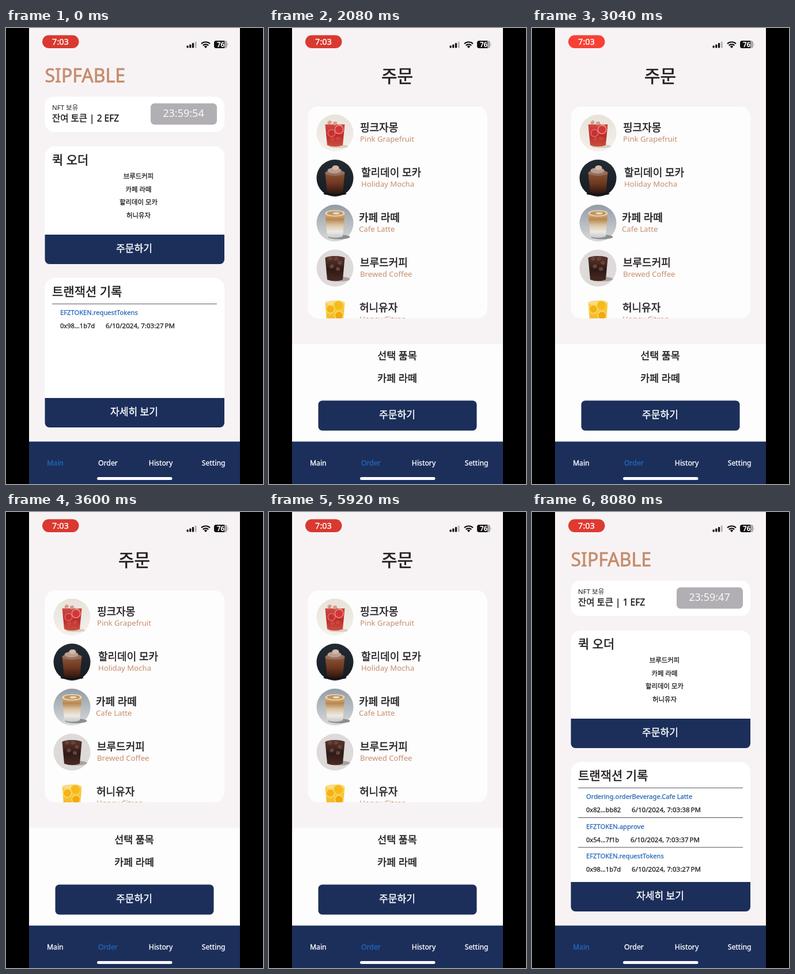
Recreate the animation shown at these times as an HTML page. Size 446 by 790 pixels, loop 8.16 s.

```html
<!DOCTYPE html>
<html lang="ko">
<head>
<meta charset="utf-8">
<style>
html, body { margin: 0; width: 100%; height: 100%; overflow: hidden; background: #000; }
svg { display: block; width: 100%; height: 100%; }
text {
  font-family: "Noto Sans", "Noto Sans CJK KR", "Noto Sans CJK", sans-serif; white-space: pre;
  fill: currentColor; stroke: currentColor; stroke-width: .024em; stroke-linejoin: round;
}
.thin { stroke: none; }
</style>
</head>
<body>
<svg id="stage" viewBox="0 0 446 790"></svg>
<script>
const LOOP = 8160, STEP = 80;
const ORDER_AT = 960, PICK_AT = 1440, ALERT_AT = 2320, ALERT_END = 3040, MAIN_AT = 6160;
const SECOND = 147; // one app second in the sped-up recording
const NAVY = '#1c2f5b', INK = '#211c21', TAN = '#c68d6c', BLUE = '#2468b8';

const text = (x, y, size, str, color = INK, more = '') =>
  `<text x="${x}" y="${y}" font-size="${size}" color="${color}" ${more}>${str}</text>`;
const mid = (x, y, size, str, color, more = '') =>
  text(x, y, size, str, color, 'text-anchor="middle" ' + more);
const rect = (x, y, w, h, r, fill, more = '') =>
  `<rect x="${x}" y="${y}" width="${w}" height="${h}" rx="${r}" fill="${fill}" ${more}/>`;
const oval = (x, y, rx, ry, fill) =>
  `<ellipse cx="${x}" cy="${y}" rx="${rx}" ry="${ry}" fill="${fill}"/>`;
const shape = (d, fill) => `<path d="${d}" fill="${fill}"/>`;
const gradient = (id, ...colors) =>
  `<linearGradient id="${id}" x2="0" y2="1">${colors.map((c, i) =>
    `<stop offset="${i / (colors.length - 1)}" stop-color="${c}"/>`).join('')}</linearGradient>`;
const footer = (y, label, x) =>
  shape(`M67.5 ${y}h311.5v43a8 8 0 0 1-8 8h-295.5a8 8 0 0 1-8-8z`, NAVY) +
  mid(x, y + 30, 17.1, label, '#fff');

// Drinks are drawn around the centre of their round picture.
const glass = (top, bottom, fill) =>
  shape(`M-17 ${top}H17L13.5 ${bottom - 3}Q0 ${bottom + 2}-13.5 ${bottom - 3}Z`, fill);
const slice = (x, y, r, rind, flesh) => oval(x, y, r, r, rind) + oval(x, y, r - 1.5, r - 1.5, flesh);
const cubes = (spots, fill) => spots.map(([x, y]) =>
  rect(x, y, 7, 6, 2, fill, `transform="rotate(${x * 3} ${x} ${y})"`)).join('');

const drinks = [
  [158, '핑크자몽', 'Pink Grapefruit', 'url(#pinkBg)',
    oval(6, 23, 17, 3, '#dccdc0') + glass(-15, 24, 'url(#pink)') +
    cubes([[-14, -18], [-4, -19], [6, -16]], '#d99a8e') +
    slice(7, -6, 8, '#e68d80', '#d3353a') + slice(-6, 0, 7, '#dd6f66', '#c92f34') +
    cubes([[2, 6], [-9, 10]], '#c9483c')],
  [160, '할리데이 모카', 'Holiday Mocha', 'url(#darkBg)',
    oval(0, 27, 20, 3, '#11151a') + glass(-9, 28, 'url(#mocha)') +
    oval(0, -9, 17, 5, '#94705f') + oval(-1, -13, 12, 5, '#bd9d8e') +
    oval(1, -18, 6, 4, '#d2b8aa')],
  [156, '카페 라떼', 'Cafe Latte', 'url(#greyBg)',
    oval(7, 24, 19, 4, '#8b8e91') + glass(-17, 26, 'url(#latte)') +
    oval(0, -17, 17, 5.5, '#e6d5bd') + oval(0, -17, 14, 3.8, '#c2955f') +
    oval(2, -17, 6, 2, '#ead8bd')],
  [158, '브루드커피', 'Brewed Coffee', '#dddad9',
    oval(9, 19, 17, 4, '#a9a19e') + glass(-18, 23, 'url(#brew)') +
    oval(0, -17, 17, 4, '#50322b') +
    cubes([[-13, -17], [-2, -19], [6, -13], [-10, -4], [2, -2]], '#6b4238')],
  [157, '허니유자', 'Honey Citron', '#fdfdfc',
    glass(-18, 26, 'url(#citron)') + oval(0, -18, 17, 4, '#f8dc85') +
    slice(6, -13, 9, '#f7cf45', '#f7ba1e') + slice(-8, -7, 8, '#fadd6a', '#f5b116') +
    slice(7, 4, 8, '#fadd6a', '#f2a80c')]
];

const menu = drinks.map(([x, ko, en, bg, art], i) => {
  const y = 182 + 78 * i;
  return `<g transform="translate(114.5 ${y})">${oval(0, 0, 32, 32, bg)}${art}</g>` +
    text(x, y - 3, 18, ko) + text(x, y + 15, 13.2, en, TAN, 'class="thin"');
}).join('');

const row = (i, call, hash, date, dateX) => {
  const y = 497 + 51.5 * i;
  return rect(80, y - 19.5, 286, 1, 0, '#55515a') +
    text(94, y, 11.2, call, BLUE) +
    text(94, y + 23, 11.1, hash) +
    text(dateX, y + 23, 11.6, `6/10/2024, 7:03:${date}\u202fPM`);
};
const request = i => row(i, 'EFZTOKEN.requestTokens', '0x98...1b7d', 27, 173);

const mainPage =
  text(67.5, 94, 32, 'SIPFABLE', TAN) +
  rect(67.5, 119, 311.5, 61, 16, '#fff') +
  text(80, 142, 11.5, 'NFT 보유', INK, 'class="thin"') +
  text(80, 162, 15.5, '', INK, 'id="balance" font-weight="500"') +
  rect(251, 130.5, 115, 37, 7, '#b1afb3') +
  mid(308, 154, 18, '', '#f8f7f8', 'id="timer" class="thin"') +
  rect(67.5, 205, 311.5, 180, 18, '#fff') +
  text(80, 236, 21, '퀵 오더') +
  ['브루드커피', '카페 라떼', '할리데이 모카', '허니유자']
    .map((s, i) => mid(230, 261 + 22.5 * i, 11.4, s)).join('') +
  footer(358, '주문하기', 222.5) +
  rect(67.5, 433, 311.5, 230, 18, '#fff') +
  text(80, 464, 21, '트랜잭션 기록') +
  `<g id="before">${request(0)}</g><g id="after">` +
  row(0, 'Ordering.orderBeverage.Cafe Latte', '0x82...bb82', 38, 173) +
  row(1, 'EFZTOKEN.approve', '0x54...7f1b', 37, 171) + request(2) + '</g>' +
  footer(641, '자세히 보기', 222.5);

const orderPage =
  mid(222.5, 94, 30, '주문') +
  rect(67.5, 136, 311.5, 367, 18, '#fdfdfd') +
  `<g clip-path="url(#list)">${menu}</g>` +
  rect(40, 547.5, 366, 170, 0, '#fdfdfd') +
  mid(222.5, 574, 17.4, '선택 품목') +
  mid(222.5, 613, 17.5, '', INK, 'id="choice"') +
  rect(85.5, 645.5, 275, 52, 7, NAVY) +
  mid(222.5, 676, 17.1, '주문하기', '#fff');

const alertBox =
  rect(40, 0, 366, 790, 0, '#000', 'opacity=".2"') +
  rect(91, 343, 264, 121, 13, '#f0eef0') +
  mid(223, 377, 15.6, '토큰을 사용하시겠습니까?', INK, 'font-weight="700" class="thin"') +
  mid(223, 397, 12.1, '토큰이 한 개 차감됩니다.', INK, 'class="thin"') +
  rect(91, 420.5, 264, 1, 0, '#d3d0d3') + rect(222.5, 421, 1, 43, 0, '#d3d0d3') +
  mid(157, 448, 15.6, '아니오', '#3189dc') +
  mid(289, 448, 15.6, '예', '#3189dc');

const statusBar =
  rect(63, 12.5, 63.5, 22.5, 11.25, 'currentColor', 'id="pill"') +
  mid(94.5, 29, 14.5, '7:03', '#fff') +
  [4, 6, 8.5, 11].map((h, i) =>
    rect(313.5 + 4.7 * i, 34.5 - h, 3.2, h, 1, i < 3 ? '#111' : '#b8b5b8')).join('') +
  '<g fill="none" stroke="#111" stroke-width="2.2">' +
  '<path d="M339 27.2a11 11 0 0 1 15 0M341.7 30.2a7 7 0 0 1 9.6 0"/></g>' +
  shape('M343.7 32a4.2 4.2 0 0 1 5.6 0L346.5 35Z', '#111') +
  rect(361, 22, 23, 13, 4, '#aaa7aa') +
  shape('M365 22h14v13h-14a4 4 0 0 1-4-4v-5a4 4 0 0 1 4-4z', '#111') +
  shape('M385 26.5q2 2 0 4z', '#aaa7aa') +
  mid(372.5, 33, 11.5, '76', '#fff', 'font-weight="700" class="thin"');

const tabs = ['Main', 'Order', 'History', 'Setting'];
const $ = id => document.getElementById(id);

$('stage').innerHTML = '<defs>' +
  gradient('pinkBg', '#e8e2da', '#f4f0eb') + gradient('darkBg', '#222b33', '#171b21') +
  gradient('greyBg', '#929ca5', '#d8dadb') + gradient('pink', '#cf4a42', '#bd2b2c', '#c9503f') +
  gradient('mocha', '#8a5638', '#6e3820', '#2c1510') +
  gradient('latte', '#d6b483', '#b98750', '#dcc7a8', '#eceae6', '#c9c8c6') +
  gradient('brew', '#5a3529', '#2d1a18', '#4a2a22') + gradient('citron', '#f9d24b', '#f3ac12') +
  `<clipPath id="list">${rect(67.5, 136, 311.5, 367, 18, '#fff')}</clipPath></defs>` +
  rect(0, 0, 446, 790, 0, '#000') + rect(40, 0, 366, 790, 0, '#f7f3f5') +
  `<g id="main">${mainPage}</g><g id="order">${orderPage}</g>` +
  rect(40, 716.5, 366, 73.5, 0, NAVY) +
  tabs.map((s, i) => mid(85.3 + 91.6 * i, 758, 12.3, s, '#fff', `id="tab${i}"`)).join('') +
  `<g id="alert">${alertBox}</g>` + statusBar + rect(158, 778, 130.5, 5, 2.5, '#fff');

const show = (id, on) => $(id).style.display = on ? '' : 'none';
const tint = (id, color) => $(id).setAttribute('color', color);

function draw(t) {
  const ordering = t >= ORDER_AT && t < MAIN_AT, done = t >= MAIN_AT;
  show('main', !ordering);
  show('order', ordering);
  show('before', !done);
  show('after', done);
  show('alert', t >= ALERT_AT && t < ALERT_END);
  tint('tab0', ordering ? '#fff' : BLUE);
  tint('tab1', ordering ? BLUE : '#fff');

  const left = done ? 59 - Math.max(0, Math.floor((t - 6180) / SECOND)) : 54 - Math.floor(t / SECOND);
  $('timer').textContent = '23:59:' + left;
  $('balance').textContent = `잔여 토큰 | ${done ? 1 : 2} EFZ`;
  $('choice').textContent = t < PICK_AT ? '음료를 한 개 선택해주세요!' : '카페 라떼';

  const wave = 0.5 + 4 * Math.sin(2 * Math.PI * (t / 297 - 0.22));
  const glow = Math.min(1, Math.max(0, wave));
  tint('pill', `rgb(${218 + 34 * glow},${57 + 8 * glow},${47 + 6 * glow})`);
}

const start = performance.now();
function tick() {
  const t = (performance.now() - start) % LOOP;
  draw(Math.floor(t / STEP) * STEP);
  requestAnimationFrame(tick);
}
tick();
</script>
</body>
</html>
```
